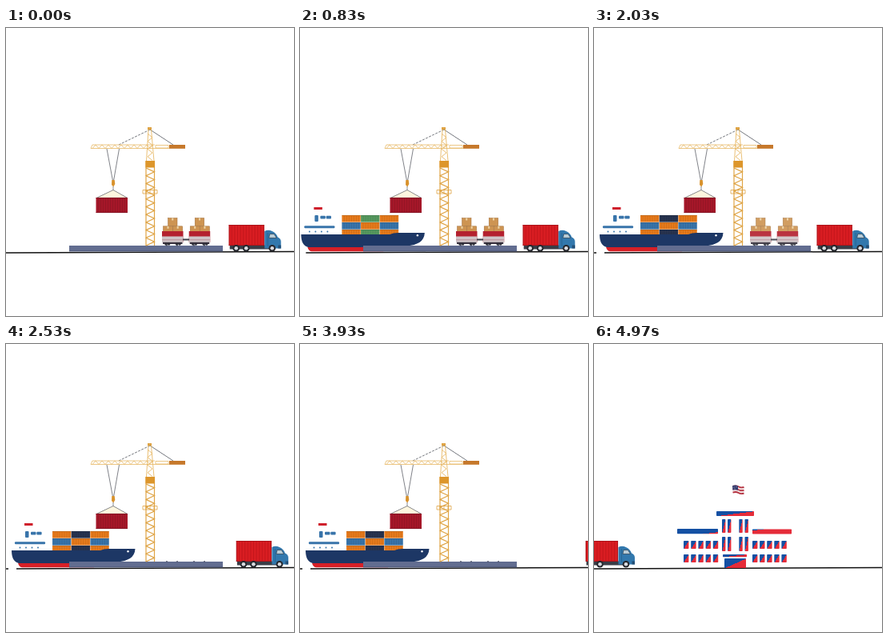
These frames come from a looping animation (360x360 px, 5 s). An HTML page:

```html
<!DOCTYPE html>
<html lang="en">
<head>
<meta charset="utf-8">
<title>Cargo journey</title>
<style>
  html, body { margin: 0; height: 100%; overflow: hidden; background: #fff; }
  svg { display: block; width: 100%; height: 100%; }
</style>
</head>
<body>
<svg id="stage" viewBox="0 0 360 360"></svg>
<script>
const LOOP = 5000, CUT = 4000, TRUCK_SPEED = 0.0494;
const NAVY = '#1d3765', BLUE = '#3874aa', ORANGE = '#e67a1b', GREEN = '#56995f';
const AMBER = '#dfa445', PALE_AMBER = '#e8b968', DARK = '#3c3f48';

const rect = (x, y, w, h, fill, extra = '') =>
  `<rect x="${x}" y="${y}" width="${w}" height="${h}" fill="${fill}" ${extra}/>`;
const path = (d, fill, stroke = 'none', width = 1, extra = '') =>
  `<path d="${d}" fill="${fill}" stroke="${stroke}" stroke-width="${width}" ${extra}/>`;
const line = (d, stroke, width, extra) => path(d, 'none', stroke, width, extra);
const each = (list, draw) => list.map(draw).join('');

// Vertical ribs of a corrugated container
function ribs(x, y, w, h, step, color) {
  let d = '';
  for (let i = x + step; i < x + w - 1; i += step) d += `M${i} ${y + 1}v${h - 2}`;
  return line(d, color, 0.7);
}

function zigzag(x, y, dx, dy, count, swingX, swingY) {
  let d = `M${x} ${y}`;
  for (let i = 1; i <= count; i++)
    d += `L${x + dx * i + (i % 2) * swingX} ${y + dy * i + (i % 2) * swingY}`;
  return d;
}

function crane() {
  return line('M180 127L141 146', DARK, 0.7, 'stroke-dasharray="3 1.5"') +
    line('M180 127L209 146', DARK, 0.7) +
    line('M106 150.5H204M108 146H186M106 150.5L108 146M187 146.5H203V150H187Z' +
      zigzag(108, 150.5, 4, 0, 19, 0, -4.5), PALE_AMBER, 0.8) +
    rect(204, 146, 20, 4.8, '#c6782b') +
    line('M178 127L175.5 166M181.5 127L185 166' + zigzag(177, 132, 0, 4.8, 7, 6, 0), PALE_AMBER, 0.9) +
    rect(177, 124, 5, 3.2, AMBER) +
    line('M175 166V272M185.5 166V272' + zigzag(175, 175, 0, 4.85, 20, 10.5, 0), AMBER, 1.2) +
    rect(174.5, 166, 11.5, 8.5, '#dd962b') +
    line('M171 202.5H189V207H171ZM175 202V207M180 202V207M185 202V207', AMBER, 0.8);
}

function load() {
  return line('M126 151L133.3 190M141.5 151L134.7 190', DARK, 0.65) +
    path('M132.3 190h3.4l.6 5-2 3.5-2.3-2.5z', '#d8922c') +
    path('M114 212L134 202.5L151 212Z', '#fdf6df') +
    line('M134 198V202.5M114 212L134 202.5L151 212', DARK, 0.6) +
    rect(112.5, 212, 39.5, 19, '#a51729') + ribs(112.5, 212, 39.5, 19, 3, '#8f1525') +
    line('M112.5 212.4H152M112.5 230.6H152', '#7c1422', 0.8);
}

function ship() {
  const cols = [58, 81.7, 105.4], rows = [[234, 9], [243, 9], [252, 6.5]];
  const cargo = each(rows, ([y, h], r) => each(cols, (x, c) => {
    const fill = r === 1 ? (c === 1 ? ORANGE : BLUE) : c === 1 ? 'currentColor' : ORANGE;
    return rect(x, y, 23.4, h - 0.4, fill) + ribs(x, y, 23.4, h, 3, '#0002') +
      line(`M${x} ${y + 0.3}h23.4`, '#0004', 0.6);
  }));
  return rect(3, 278.5, 10, 4, '#fff') + cargo +
    rect(23, 224, 10.5, 3, '#cf1f2c') +
    each([[24, 234, 4.5, 8], [31, 234.8, 6.5, 3.8], [38.3, 234.8, 6.3, 3.8], [11, 247.3, 38, 3]],
      ([x, y, w, h]) => rect(x, y, w, h, BLUE, 'rx="1"')) +
    each([17.5, 25, 32.5, 40], x => `<circle cx="${x}" cy="254.5" r="1" fill="${BLUE}"/>`) +
    path('M15 273.5H110V279.3H20Q16 278.5 15 273.5Z', '#d61f26') +
    path('M7 258H118Q122 256 128 256H161.5Q161 264 155 268Q149 271.5 140 272.5L80 274H16Q7 272 7 258Z', NAVY) +
    `<circle cx="152.5" cy="259.3" r="1.2" fill="#fff"/>`;
}

function wagon(x) {
  const box = (bx, y, w, h) => rect(bx, y, w, h, '#cd9452', 'stroke="#a06c37" stroke-width=".5"') +
    rect(bx + w / 2 - 1, y, 2, 3, '#eed3a4');
  return box(x + 7.5, 237.5, 11.5, 10) + box(x + 1.5, 247.8, 12, 7) + box(x + 13.7, 247.8, 12, 7) +
    rect(x, 254, 26.5, 14, '#b4212f') + rect(x, 260.5, 26.5, 7.5, '#cfc5c8') +
    rect(x, 264.3, 26.5, 1, '#b98f97') + rect(x + 1, 267.8, 24.5, 2.2, '#3b3340') +
    each([5, 8.5, 18.5, 22], d => `<circle cx="${x + d}" cy="270" r="1.8" fill="#30303a"/>`);
}

function truck() {
  const wheel = x => `<circle cx="${x}" cy="275.3" r="4.3" fill="#25272d"/>
    <circle cx="${x}" cy="275.3" r="2.3" fill="#d9dbe0"/>`;
  return rect(1, 271.5, 50, 5, '#3a3d47') +
    path('M44.5 254Q49 251.5 54 254Q59 256 61 261.5Q65 263 65 267V275.5H44.5Z', '#3278ad') +
    path('M51 257.5H56.5L59.5 262.5H50Z', '#b9ccd6', '#334b60', 0.8) +
    line('M48.5 256V273', '#245f8d', 0.7) + rect(61.5, 271.5, 3.5, 4, '#244f76') +
    rect(0, 246, 44, 26, '#d91d22') + ribs(0, 246, 44, 26, 3.6, '#ba151a') +
    line('M0 246.5H44M0 271.5H44M.4 246V272M43.6 246V272', '#a9141a', 0.9) +
    each([9, 21.5, 54], wheel);
}

// Two colours meeting along the diagonal of each block
const split = (id, at) => `<linearGradient id="${id}" x2="1" y2="1">
  <stop offset="${at}" stop-color="#1450a3"/><stop offset="${at}" stop-color="#e52c39"/></linearGradient>`;

function building() {
  const block = (x, y, w, h, g = 'half') => rect(x, y, w, h, `url(#${g})`, 'rx=".8"');
  return block(153, 209, 47, 6) + block(104, 231, 51, 6.3, 'mostBlue') +
    block(198, 231.5, 49, 6, 'mostRed') +
    each([[219, 17], [241, 18]], ([y, h]) => each([160, 167, 181.3, 188.5], x => block(x, y, 4.4, h))) +
    each([246, 263], y => each([0, 1, 2, 3, 4], i =>
      block(112 + i * 9.2, y, 6.4, 10) + block(198 + i * 9.1, y, 6.4, 10))) +
    block(161, 263, 30, 3.2) + block(163, 268, 27, 12);
}

function flag() {
  const stripe = i => line(`M173.5 ${178 + i * 1.9}q4-1.5 7 .4t7 .6`, i % 2 ? '#f1dfe0' : '#b53442', 1.9);
  return each([0, 1, 2, 3, 4], stripe) + path('M173 177.2q4-1.5 7 .3v5.3q-3-1.2-6.6-.2z', '#343b6e') +
    line('M174.5 179h1M177.5 178.7h1M175.5 181h1', '#fff', 0.6);
}

const ground = line('M0 280.9L360 279.4', '#111', 1.5);
const platform = rect(79, 272, 192, 7.3, '#626d90') + line('M79 278.7H271', '#515b7c', 1) +
  each([201, 214, 235, 248], x => rect(x - 1, 271.3, 2, 1.3, '#4a5068'));

stage.innerHTML = `<defs>${split('half', 0.52)}${split('mostBlue', 0.83)}${split('mostRed', 0.14)}</defs>
  ${ground}
  <g id="port"><g id="vessel">${ship()}</g>${platform}${crane()}${load()}
    <g id="train">${wagon(195)}${wagon(228.7)}${rect(221, 263.5, 8, 2, DARK)}</g></g>
  <g id="hall">${building()}${flag()}</g>
  <g id="lorry">${truck()}</g>`;

const [port, vessel, train, hall, lorry] =
  ['port', 'vessel', 'train', 'hall', 'lorry'].map(id => document.getElementById(id));
const clamp = v => Math.min(1, Math.max(0, v));
const moveX = (el, x) => el.setAttribute('transform', `translate(${x} 0)`);

function draw() {
  const t = performance.now() % LOOP, atHall = t >= CUT;
  port.style.display = atHall ? 'none' : '';
  hall.style.display = atHall ? '' : 'none';
  moveX(vessel, -40 * (1 - clamp(t / 1330)) ** 2);
  vessel.style.opacity = clamp(t / 800);
  vessel.style.color = t < 2000 ? GREEN : '#27334f';
  train.style.opacity = 1 - clamp((t - 2000) / 350);
  moveX(lorry, atHall ? -62 + (t - CUT) * TRUCK_SPEED : 278.7 + Math.max(0, t - 2345) * TRUCK_SPEED);
  requestAnimationFrame(draw);
}
draw();
</script>
</body>
</html>
```
